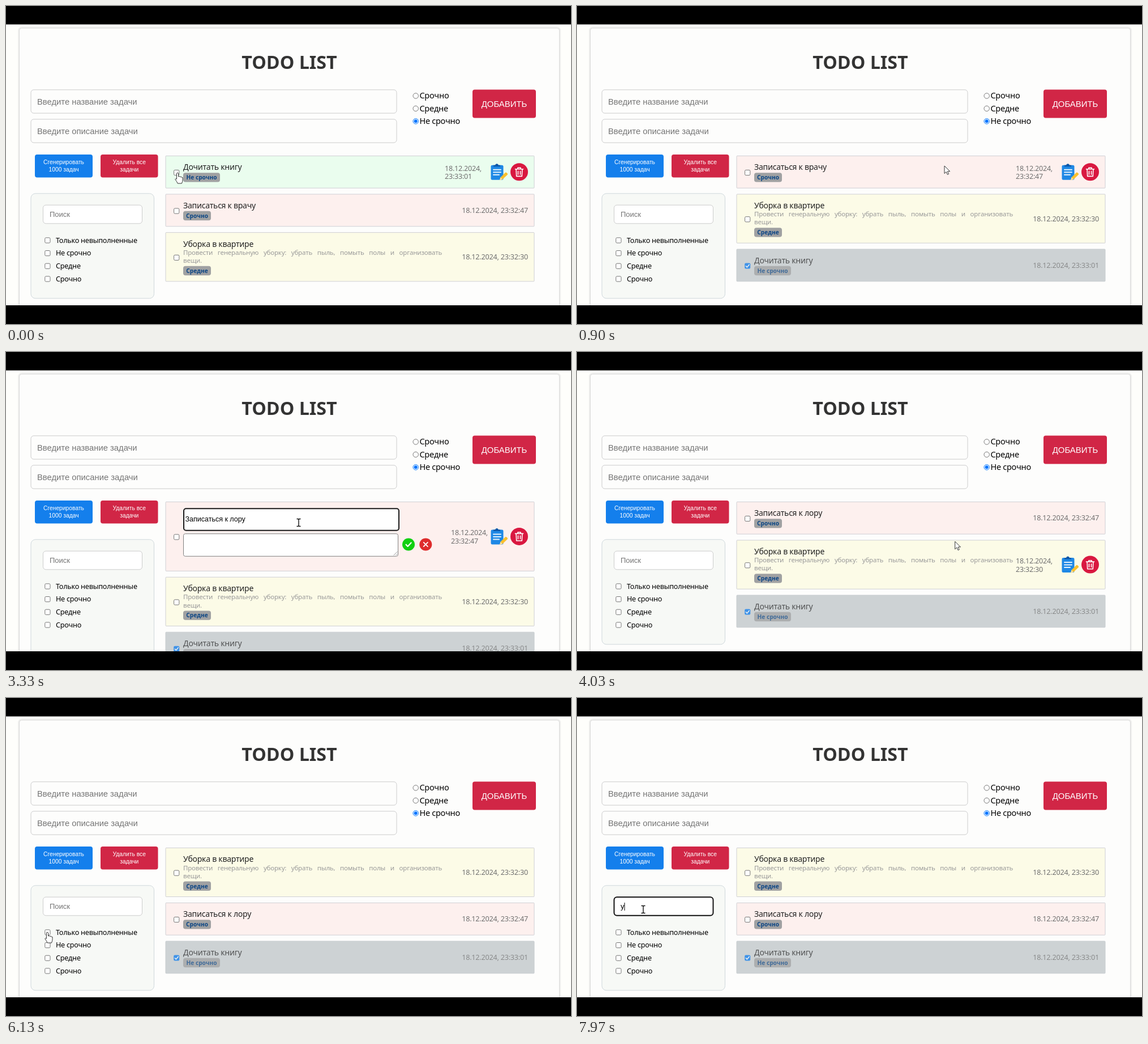
Recreate the animation shown at these times as an HTML page. Size 998x561 px, loop 8 s.

```html
<!DOCTYPE html>
<html lang="ru">
<head>
<meta charset="utf-8">
<title>Todo list</title>
<style>
html, body { margin: 0; width: 100%; height: 100%; overflow: hidden; background: #000; }
svg { display: block; width: 100%; height: 100%; }
text { white-space: pre; }
.ui, .desc { font-family: "Noto Sans", "Open Sans", sans-serif; letter-spacing: -.02em; }
.form { font-family: "Liberation Sans", Arial, sans-serif; }
.badge { font: 800 10.2px "Noto Sans", "Open Sans", sans-serif; }
.desc { font-size: 11.5px; line-height: 14.3px; color: #999; white-space: nowrap; }
.desc div:first-child { text-align: justify; text-align-last: justify; }
</style>
</head>
<body>
<svg id="stage" viewBox="0 0 998 561">
  <clipPath id="view"><rect y="32.5" width="998" height="495.5"/></clipPath>
  <rect width="998" height="561"/>
  <g clip-path="url(#view)">
    <rect width="998" height="561" fill="#fefefb"/>
    <g id="page"></g>
    <g id="side"></g>
    <g id="list"></g>
    <path id="cursor" stroke-linejoin="round"/>
  </g>
</svg>
<script>
const LOOP = 8000;
const $ = id => document.getElementById(id);
const clamp = (v, lo, hi) => Math.min(hi, Math.max(lo, v));

// Click times
const T = { check: 300, edit: 1450, save: 3850, done: 4550, undo: 5350, filterOn: 6260, filterOff: 6800, search: 7250, type: 7650 };
const ERASE = 1950, WRITE = 2450, LAST_KEY = WRITE + 3 * 110;

// Pointer stops: time, x, y
const PATH = [
  [0, 303, 294], [450, 303, 294], [850, 649, 282], [960, 649, 282],
  [1350, 867, 292], [1500, 867, 292], [1790, 517, 301], [3400, 517, 301],
  [3750, 711, 339], [3930, 711, 339], [4430, 302, 294], [4690, 302, 294],
  [4810, 302, 301], [4900, 302, 301], [5220, 302, 390], [5550, 302, 390],
  [6000, 73, 413], [6860, 73, 413], [7150, 117, 373], [8000, 117, 373]
];

const TASKS = {
  b: { title: 'Дочитать книгу', tag: 'Не срочно', time: '23:33:01', fill: '#eafdee', h: 56.8 },
  d: { title: 'Записаться к врачу', tag: 'Срочно', time: '23:32:47', fill: '#fdf0ee', h: 56.8 },
  h: { title: 'Уборка в квартире', tag: 'Средне', time: '23:32:30', fill: '#fcfbe7', h: 86.2, desc: true }
};

const text = (x, y, s, size, fill = '#000', cls = 'ui', extra = '') =>
  `<text x="${x}" y="${y}" font-size="${size}" fill="${fill}" class="${cls}" ${extra}>${s}</text>`;
const box = (x, y, w, h, r, fill, stroke = 'none', sw = 1) =>
  `<rect x="${x}" y="${y}" width="${w}" height="${h}" rx="${r}" fill="${fill}" stroke="${stroke}" stroke-width="${sw}"/>`;
const line = (d, stroke, w) =>
  `<path d="${d}" fill="none" stroke="${stroke}" stroke-width="${w}" stroke-linecap="round" stroke-linejoin="round"/>`;
const disc = (x, y, r, fill, stroke = 'none') => `<circle cx="${x}" cy="${y}" r="${r}" fill="${fill}" stroke="${stroke}"/>`;
const at = (x, y, s) => `<g transform="translate(${x} ${y})">${s}</g>`;

const checkbox = (x, y, on) => at(x, y, on
  ? box(-5, -5, 10, 10, 2, '#0a7cf0') + line('M-2.8 .2L-.8 2.3 3-2.4', '#fff', 1.5)
  : box(-4.6, -4.6, 9.2, 9.2, 1.8, '#fff', '#767676'));

const button = (x, y, w, h, fill, size, lines, base) => box(x, y, w, h, 4, fill) +
  lines.map((s, i) => text(x + w / 2, base + i * 13, s, size, '#fff', 'form', 'text-anchor="middle"')).join('');

const field = (y, hint) => box(44, y, 646, 41.3, 5, '#fdfdfc', '#ccc') + text(55, y + 25.8, hint, 14.8, '#757575', 'form');

const clipboard =
  box(-12.5, -12, 22, 26, 2.5, '#1e88e5') +
  '<path d="M-8-9.5V-12H-5Q-4.5-14.5-2-14.5T1-12H4V-9.5Z" fill="#0d57a8"/>' +
  line('M-8-4H5M-8 .5H5M-8 5H2', '#e3f2fd', 2) +
  '<path d="M3 14.5L4.6 9.4 13.4.6Q17 1.2 17.2 4.4L8.2 13Z" fill="#fbc02d"/>' +
  '<path d="M3 14.5L4.6 9.4 8.2 13Z" fill="#ffe0a3"/>';

const trash = disc(0, 0, 15.5, '#d91840') +
  line('M-7-5H7M-2.6-5.2V-7.4H2.6V-5.2M-5.4-4.6L-4.8 7.6H4.8L5.4-4.6M-2-1.4V4.4M2-1.4V4.4', '#fff', 1.6);

function drawPage() {
  const radios = ['Срочно', 'Средне', 'Не срочно'].map((s, i) => {
    const y = 158.5 + i * 22.4, on = i === 2;
    return disc(723.7, y, 4.7, '#fff', on ? '#0075ff' : '#767676') +
      (on ? disc(723.7, y, 3, '#0075ff') : '') + text(730.5, y + 4.7, s, 14.5);
  }).join('');
  $('page').innerHTML =
    box(22.5, 38, 956, 600, 5, 'none', '#f0f0ee', 3) +
    box(23.5, 39, 954, 600, 4, '#fdfdfc', '#d8d8d8') +
    text(500.5, 111, 'TODO LIST', 32.2, '#333', 'ui', 'text-anchor="middle" font-weight="700" style="letter-spacing:0"') +
    field(147.8, 'Введите название задачи') + field(199.8, 'Введите описание задачи') + radios +
    button(824, 147.5, 112, 50, '#d12646', 14.9, ['ДОБАВИТЬ'], 177.7) +
    button(51, 262, 102, 40.5, '#147fec', 10.3, ['Сгенерировать', '1000 задач'], 279.3) +
    button(167, 262, 101.5, 40.5, '#d12646', 10.3, ['Удалить все', 'задачи'], 279.3);
}

function drawSide(s) {
  const labels = ['Только невыполненные', 'Не срочно', 'Средне', 'Срочно'];
  const focus = s.search;
  $('side').innerHTML =
    box(44, 330.8, 217.5, s.edit ? 260 : 185, 8, '#f7f9f6', '#cfd8dc') +
    box(65.5, 351.2, 175, 32.6, 5, '#fff', focus ? '#111' : '#ccc', focus ? 2 : 1) +
    text(77, 372.3, focus && s.query ? s.query : 'Поиск', 13, s.query ? '#000' : '#757575', 'form', 'id="query"') +
    labels.map((l, i) => checkbox(73.4, 413.4 + i * 22.7, i === 0 && s.filter) + text(88, 417.5 + i * 22.7, l, 12.6)).join('');
  if (focus && s.caret) addCaret('side', $('query'), s.query ? null : 77, 361, 14);
}

function addCaret(group, el, x, y, h) {
  const end = x ?? +el.getAttribute('x') + el.getComputedTextLength();
  $(group).insertAdjacentHTML('beforeend', box(end, y, 1, h, 0, '#000'));
}

function editor(s) {
  return box(314, 276.2, 380, 38.6, 4, '#fff', '#1a1a1a', 2) +
    text(316.5, 299.4, s.draft, 12.5, '#000', 'form', 'id="draft"') +
    box(313.5, 320.7, 379, 39.6, 3, '#fff', '#808080') +
    line('M685 358.5L691 352.5M689 358.5L691 356.5', '#777', .8) +
    at(711, 339.5, disc(0, 0, 11, '#12d012') + line('M-4.4.2L-1.4 3.4 4.6-3', '#fff', 2.2)) +
    at(741.3, 339.5, disc(0, 0, 11, '#de2c2c') + line('M-3.6-3.6L3.6 3.6M3.6-3.6L-3.6 3.6', '#fff', 1.8));
}

function rowBody(r, s) {
  const { task, y, h, editing, hover, done } = r, mid = y + h / 2;
  const tagY = y + (task.desc ? 59.2 : 29.8);
  const tagW = task.tag.length > 6 ? 65 : 49;
  let out = checkbox(301.2, mid + (editing ? 1 : 1.2), done);
  if (editing) out += editor(s);
  else {
    out += text(313, y + 25, r.title, 14, '#222') +
      box(313, tagY, tagW, 16.4, 4, '#a0a1a2') +
      text(313 + tagW / 2, tagY + 12, task.tag, 10.2, '#0b4584', 'badge', 'text-anchor="middle"');
    if (task.desc) out += `<foreignObject x="313" y="${y + 28.2}" width="457" height="32">
      <div xmlns="http://www.w3.org/1999/xhtml" class="desc"><div>Провести генеральную уборку: убрать пыль, помыть полы и организовать</div><div>вещи.</div></div></foreignObject>`;
  }
  const day = '18.12.2024,', grey = '#707070';
  if (hover) {
    const x = editing ? 786 : 775;
    out += text(x, mid - 2, day, 12.6, grey) + text(x, mid + 12.4, task.time, 12.6, grey) +
      at(869, mid, clipboard) + at(906.5, mid, trash);
  } else out += text(922, mid + 4.4, `${day} ${task.time}`, 12.7, grey, 'ui', 'text-anchor="end"');
  return out;
}

function drawList(s) {
  $('list').innerHTML = s.rows.map(r =>
    box(282, r.y, 651, r.h, 1, r.done ? '#cdd2d4' : r.task.fill, r.done ? '#c8cdd0' : '#cfcfd4') +
    `<g opacity="${r.done ? .72 : 1}">${rowBody(r, s)}</g>`).join('');
  if (s.edit && s.caret) addCaret('list', $('draft'), null, 288, 14);
}

function pointer(t) {
  const i = PATH.findIndex(p => p[0] > t), a = PATH[i - 1], b = PATH[i];
  const u = (t - a[0]) / (b[0] - a[0]), k = u * u * (3 - 2 * u);
  return [a[1] + (b[1] - a[1]) * k, a[2] + (b[2] - a[2]) * k];
}

function draftAt(t) {
  const gone = clamp(Math.floor((t - ERASE) / 100) + 1, 0, 5);
  const added = clamp(Math.floor((t - WRITE) / 110) + 1, 0, 4);
  return 'Записаться к ' + 'врачу'.slice(0, 5 - gone) + 'лору'.slice(0, added);
}

function stateAt(t) {
  const [px, py] = pointer(t);
  const edit = t >= T.edit && t < T.save;
  const filter = t >= T.filterOn && t < T.filterOff;
  const done = { b: t >= T.check, d: t >= T.done && t < T.undo };
  const order = t < T.check ? 'bdh' : t < T.done ? 'dhb' : 'hdb';
  const search = t >= T.search;
  const since = search ? (t < T.type ? T.search : T.type)
    : t < ERASE ? T.edit : Math.min(t, LAST_KEY);
  let y = 264.4;
  const rows = [...order].filter(k => !(filter && done[k])).map(k => {
    const task = TASKS[k], editing = edit && k === 'd', h = editing ? 122 : task.h;
    const row = {
      task, y, h, editing, done: !!done[k],
      title: k === 'd' && t >= T.save ? 'Записаться к лору' : task.title,
      hover: px > 282 && px < 933 && py > y && py < y + h
    };
    y += h + 10.8;
    return row;
  });
  return { px, py, edit, filter, search, rows, draft: draftAt(t), query: t >= T.type ? 'у' : '', caret: (t - since) % 1000 < 500 };
}

const SHAPES = {
  arrow: 'M0 0V13.5L3.2 10.6 5.4 15.4 7.6 14.4 5.4 9.8H9.8Z',
  hand: 'M-1.6 1.2Q0-.8 1.6 1.2V7L3 6.4 4.6 7.4 6 7 7.4 8.2 9 8.6V13Q9 15.5 7.4 19H.2Q-1 16-4.2 11.6-3.4 9.6-1.6 11.4Z',
  beam: 'M-3.5-6.5H-1L0-5.5 1-6.5H3.5M0-5.5V5.5M-3.5 6.5H-1L0 5.5 1 6.5H3.5'
};

function shapeAt({ px, py, edit, rows }) {
  const inside = (x, y, w, h) => px >= x && px <= x + w && py >= y && py <= y + h;
  const near = (x, y, r) => Math.abs(px - x) <= r && Math.abs(py - y) <= r;
  if (inside(65, 351, 176, 33) || edit && inside(313, 275, 381, 86)) return 'beam';
  if (edit && (near(711, 339.5, 11) || near(741, 339.5, 11)) || near(73.4, 413.4, 5)) return 'hand';
  const row = rows.find(r => r.hover);
  if (!row) return 'arrow';
  const mid = row.y + row.h / 2;
  return near(301.2, mid + 1.2, 5) || near(869, mid, 14) || near(906.5, mid, 15) ? 'hand' : 'arrow';
}

let lastKey = '';
function render(t) {
  const s = stateAt(t), { px, py, ...view } = s;
  const key = JSON.stringify(view);
  if (key !== lastKey) {
    lastKey = key;
    drawSide(s);
    drawList(s);
  }
  const shape = shapeAt(s), c = $('cursor');
  c.setAttribute('d', SHAPES[shape]);
  c.setAttribute('fill', shape === 'beam' ? 'none' : '#fff');
  c.setAttribute('stroke', shape === 'beam' ? '#111' : '#333');
  c.setAttribute('stroke-width', shape === 'beam' ? 1.4 : 1);
  c.setAttribute('transform', `translate(${px} ${py})`);
}

drawPage();
render(0);
const start = performance.now();
(function tick() {
  render((performance.now() - start) % LOOP);
  requestAnimationFrame(tick);
})();
</script>
</body>
</html>
```
